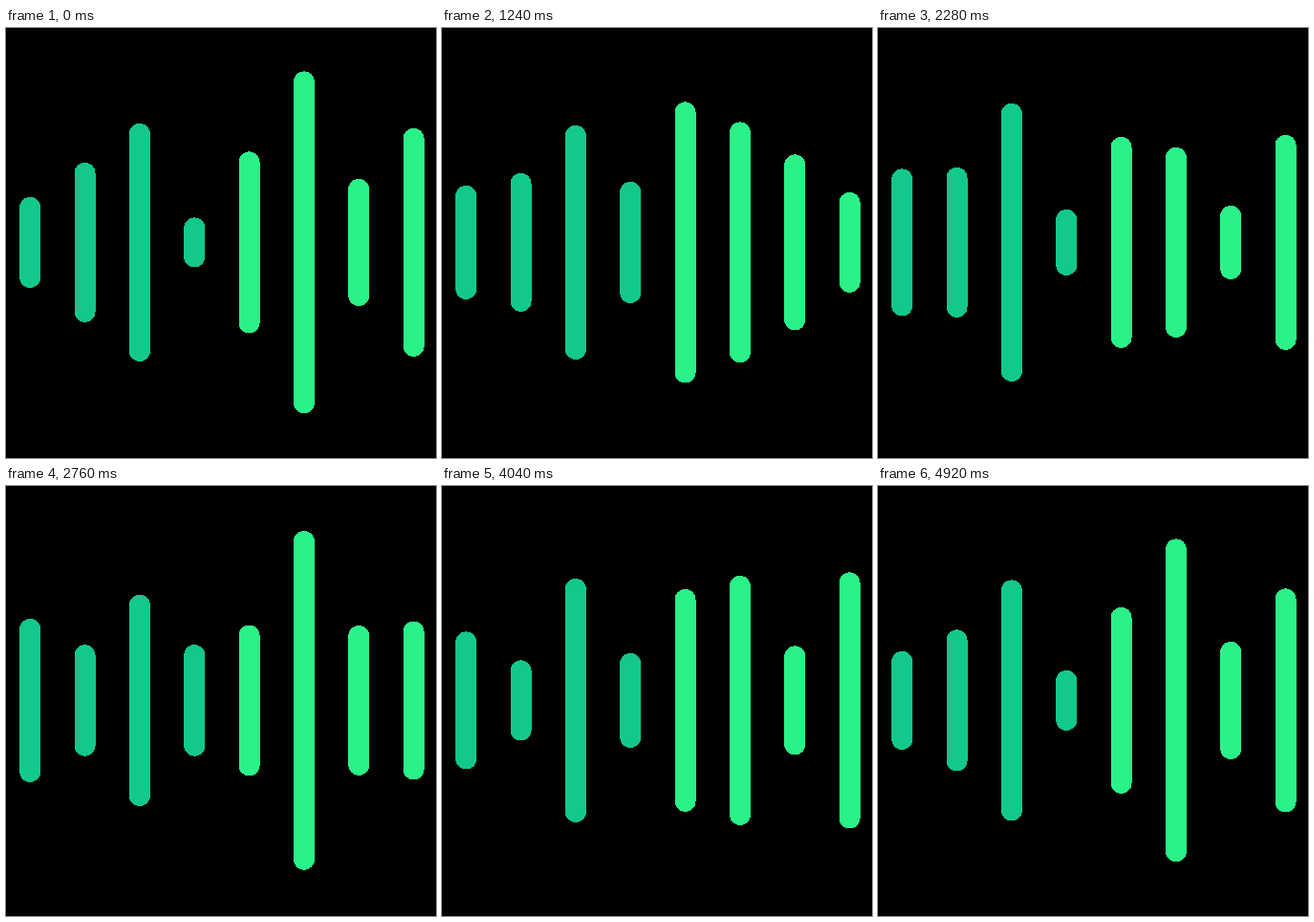
An HTML page that plays this animation: 450x450 px, repeating every 4960 ms.

```html
<!DOCTYPE html>
<html lang="en">
<head>
<meta charset="utf-8">
<title>Sound wave</title>
<style>
  html, body { margin: 0; width: 100%; height: 100%; overflow: hidden; background: #000; }
  svg { display: block; width: 100%; height: 100%; }
</style>
</head>
<body>
<svg id="stage" viewBox="0 0 450 450" shape-rendering="crispEdges"></svg>
<script>
const LOOP = 4960, STEP = 40, TURN = 2 * Math.PI, SWING = 800;
const WIDTH = 22, LEFT = 14.2, PITCH = 57.34, MIDDLE = 224.4;
const DARK = '#12c88d', LIGHT = '#2af288';

// Key poses: time and the eight bar lengths
const poses = [
  { at: 0, bars: [95, 167, 249, 52, 190, 358, 133, 239] },
  { at: 600, bars: [206, 153, 286, 107, 120, 358, 134, 288] },
  { at: 1240, bars: [119, 145, 245, 127, 294, 252, 184, 105] },
  { at: 2280, bars: [154, 157, 291, 69, 221, 199, 77, 225] },
  { at: 3200, bars: [123, 101, 116, 64, 290, 195, 141, 206] },
  { at: 4040, bars: [144, 84, 255, 99, 233, 261, 114, 268] },
  { at: 4920, bars: [103, 148, 252, 63, 195, 338, 123, 234] }
];
const last = poses.length - 1;

// Each bar swings between its shortest and longest pose;
// a pose is an angle on that swing, with whole turns in between.
function makeSwing(index) {
  const lengths = poses.map(pose => pose.bars[index]);
  const low = Math.min(...lengths), range = Math.max(...lengths) - low;
  const way = Math.sign(lengths[0] - lengths[last]);
  const angles = lengths.map(v => way * Math.acos(1 - 2 * (v - low) / range));

  return (from, to, u, turns) => {
    const angle = angles[from] + (angles[to] + turns * TURN - angles[from]) * u;
    return low + range * (1 - Math.cos(angle)) / 2;
  };
}

const stage = document.getElementById('stage');
const bars = poses[0].bars.map((_, i) => {
  const rect = document.createElementNS(stage.namespaceURI, 'rect');
  const look = { x: LEFT + PITCH * i, width: WIDTH, rx: WIDTH / 2, fill: i < 4 ? DARK : LIGHT };
  for (const name in look) rect.setAttribute(name, look[name]);
  stage.append(rect);
  return { rect, lengthAt: makeSwing(i) };
});

function draw(t) {
  const from = poses.findLastIndex(pose => pose.at <= t);
  const to = (from + 1) % poses.length;
  const span = (poses[to].at || LOOP) - poses[from].at;
  const u = (t - poses[from].at) / span, turns = Math.round(span / SWING);
  for (const { rect, lengthAt } of bars) {
    const length = lengthAt(from, to, u, turns);
    rect.setAttribute('y', MIDDLE - length / 2);
    rect.setAttribute('height', length);
  }
}

let start;
function tick(now) {
  start ??= now;
  draw(Math.floor(Math.max(0, now - start) % LOOP / STEP) * STEP);
  requestAnimationFrame(tick);
}
draw(0);
requestAnimationFrame(tick);
</script>
</body>
</html>
```
